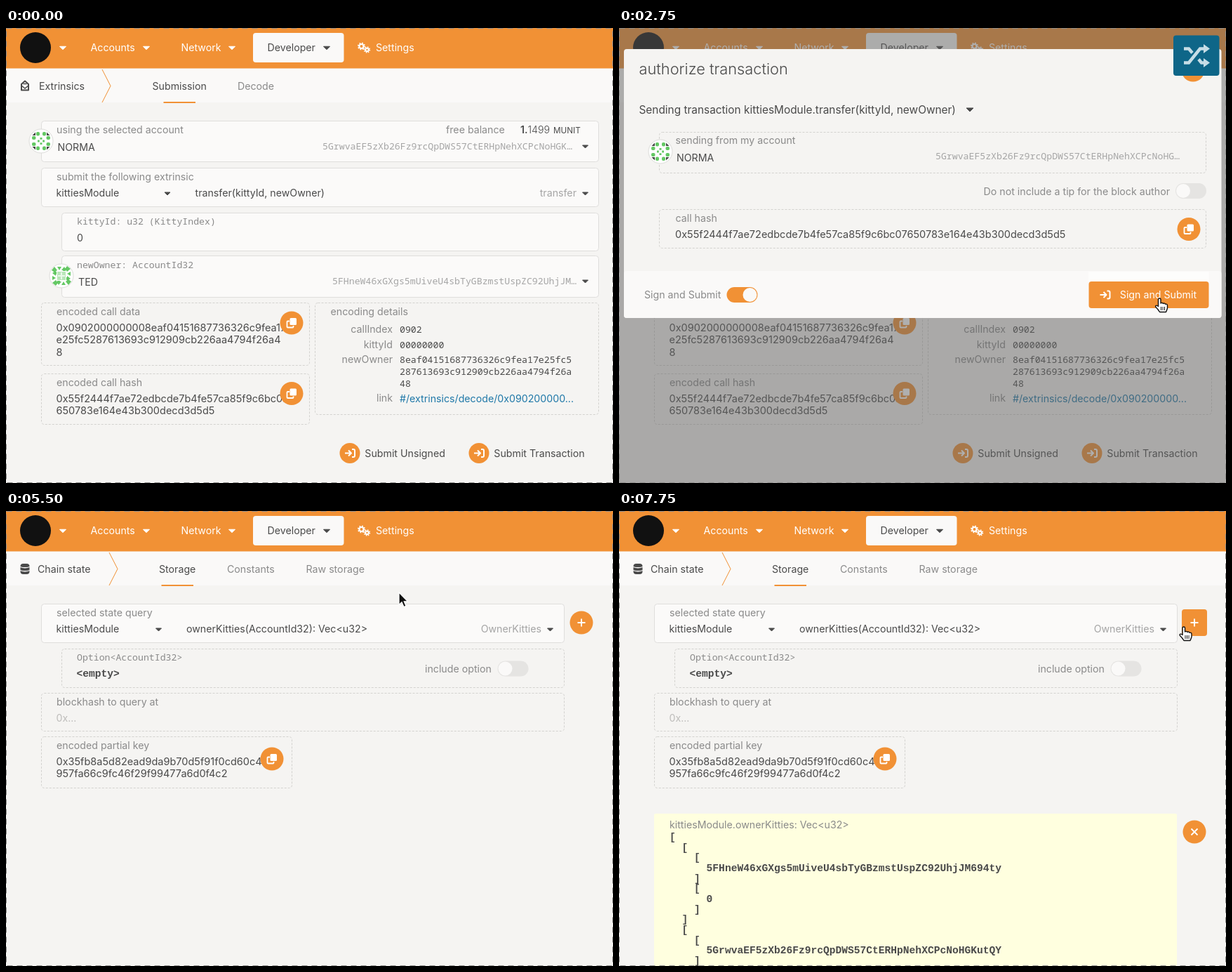
Animation of 865x648 px, one loop 8 s. Source, as an HTML page:

```html
<!DOCTYPE html>
<html lang="en">
<head>
<meta charset="utf-8">
<title>Submitting an extrinsic</title>
<style>
html, body { margin: 0; width: 100%; height: 100%; overflow: hidden; background: #f5f4f2; }
svg { display: block; width: 100%; height: 100%; }
text { font: 14.2px Inter, "Open Sans", sans-serif; fill: #4a4a4a; white-space: pre; }
.grey { fill: #8a8a8a; }
.pale { fill: #a5a5a5; }
.faint { fill: #bdbcba; }
.white { fill: #fff; }
.link { fill: #1f78a8; }
.hash { font-size: 14.5px; }
.mono { font: 13.2px "Noto Sans Mono", "DejaVu Sans Mono", monospace; }
.code { font: bold 14.6px "Liberation Mono", "Courier New", monospace; }
.medium { font-weight: 500; }
.end { text-anchor: end; }
.title { font-size: 21.8px; font-weight: 300; }
.lead { font-size: 15.4px; }
</style>
</head>
<body>
<svg id="stage" viewBox="0 0 865 648" xmlns="http://www.w3.org/2000/svg"></svg>
<script>
const ORANGE = '#f19135', INK = '#4a4a4a', GREEN = '#64c864';
const SENDER_KEY = '5GrwvaEF5zXb26Fz9rcQpDWS57CtERHpNehXCPcNoHGKutQY';
const RECEIVER_KEY = '5FHneW46xGXgs5mUiveU4sbTyGBzmstUspZC92UhjJM694ty';
const CALL_HASH = '0x55f2444f7ae72edbcde7b4fe57ca85f9c6bc07650783e164e43b300decd3d5d5';
const SENDER = 'NORMA', RECEIVER = 'TED';

// ---- drawing helpers ----
const esc = s => s.replace(/&/g, '&amp;').replace(/</g, '&lt;');
const text = (x, y, s, cls = '') => `<text x="${x}" y="${y}" class="${cls}">${esc(s)}</text>`;
const rect = (x1, y1, x2, y2, fill, r = 0, extra = '') =>
  `<rect x="${x1}" y="${y1}" width="${x2 - x1}" height="${y2 - y1}" rx="${r}" fill="${fill}" ${extra}/>`;
const disc = (x, y, r, fill, extra = '') => `<circle cx="${x}" cy="${y}" r="${r}" fill="${fill}" ${extra}/>`;
const line = (d, color, w = 1, extra = '') =>
  `<path d="${d}" fill="none" stroke="${color}" stroke-width="${w}" ${extra}/>`;
const group = (id, ...parts) => `<g id="${id}">${parts.join('')}</g>`;
const at = (x, y, s) => `<g transform="translate(${x} ${y})">${s}</g>`;

const caret = (x, y, fill = INK, w = 4.5) =>
  `<path d="M${x - w} ${y - w / 2}h${2 * w}l${-w} ${w}z" fill="${fill}" stroke="${fill}" stroke-linejoin="round"/>`;
const field = (x1, y1, x2, y2) => rect(x1 + .5, y1 + .5, x2 - .5, y2 - .5, '#fbfaf9', 4, 'stroke="#dfdedc"');
const dashed = (x1, y1, x2, y2) =>
  rect(x1 + .5, y1 + .5, x2 - .5, y2 - .5, 'none', 4, 'stroke="#d3d2cf" stroke-dasharray="3 2"');
const outline = (id, x1, y1, x2, y2) =>
  group(id, rect(x1 + .5, y1 + .5, x2 - .5, y2 - .5, 'none', 4, 'stroke="#a3a2a0"'));

const signIcon = (x, y) => at(x, y,
  line('M-7 0H1M-2 -4L2 0L-2 4M3 -5.5H5Q7 -5.5 7 -3.5V3.5Q7 5.5 5 5.5H3', '#fff', 2, 'stroke-linejoin="round"'));
const action = (x, y, label) => disc(x, y, 14.5, ORANGE) + signIcon(x, y) + text(x + 21.3, y + 5.3, label);
const solidAction = (x, y, x2, label) =>
  rect(x - 23, y - 19, x2, y + 19, ORANGE, 4) + signIcon(x, y) + text(x + 21.3, y + 5.3, label, 'white');
const copyButton = (x, y) => disc(x, y, 16.5, ORANGE) + at(x, y,
  line('M-3 -2.5H-5.5Q-6.5 -2.5 -6.5 -1.5V5.5Q-6.5 6.5 -5.5 6.5H1.5Q2.5 6.5 2.5 5.5V4', '#fff', 1.8) +
  rect(-2.5, -7, 7, 3, '#fff', 1.5));
const toggle = (x, y, on) => rect(x, y, x + 44, y + 22, on ? ORANGE : '#e5e4e2', 11) +
  disc(on ? x + 33 : x + 11, y + 11, 10, '#faf9f8');
const plusIcon = line('M814.5 159H825.5M820 153.5V164.5', '#fff', 2);

const turns = s => [0, 90, 180, 270].map(a => `<g transform="rotate(${a})">${s}</g>`).join('');
const badge = (x, y, inner) => at(x, y, disc(0, 0, 17, '#fff', 'stroke="#dddcda"') + inner);
const ringIcon = (x, y) => badge(x, y, turns(
  rect(-7, -13, -2, -7.5, GREEN, 2) + rect(2, -13, 7, -7.5, GREEN, 2) +
  '<path d="M8 -12.5l4.5 4.5h-4.5z" fill="#444"/>' + rect(-1.5, -5, 1.5, -2.2, GREEN, .5)));
const gridIcon = (x, y) => badge(x, y, rect(-6, -6, 6, 6, '#b9e6b9') + turns(
  '<path d="M-14 -8l4 -5l4 5l-4 3zM-6 -13h6l-3 5zM0 -8l4 -5l3 5z" fill="' + GREEN + '"/>' +
  rect(-11, -6, -7, -2, GREEN) + line('M0 -5V0', '#e9f8e9', 2)));

const gear = (x, y, r) => disc(x, y, r, 'none', 'stroke="#fff" stroke-width="2"') +
  disc(x, y, r + 1.5, 'none', `stroke="#fff" stroke-width="2" stroke-dasharray="${(r + 1.5) * Math.PI / 8}"`);

const subBar = (label, x, bend) => rect(0, 58, 865, 106, '#faf9f8') + text(x, 87.5, label) +
  line(`M${bend} 59L${bend + 12} 82.5L${bend} 106`, ORANGE);

// ---- header shared by both pages ----
const header = rect(0, 0, 865, 57.5, ORANGE) +
  disc(42, 28, 22, '#111') + caret(81, 28.5, '#fff') +
  text(120.5, 33, 'Accounts', 'white') + caret(200, 28.5, '#fff') +
  text(249.5, 33, 'Network', 'white') + caret(322, 28.5, '#fff') +
  rect(352, 7, 481.5, 49, '#faf9f8', 4) + text(372.5, 33, 'Developer') + caret(457, 28.5) +
  gear(506.5, 26, 3) + gear(514.5, 31, 2.2) + text(527, 33, 'Settings', 'white');

// ---- extrinsics page ----
const detail = (y, key, ...values) => text(551, y, key, 'grey end') +
  values.map((v, i) => text(561, y + i * 17.4, v, 'mono medium')).join('');

const extrinsics = group('extrinsics',
  subBar('Extrinsics', 47, 137),
  line('M22 80L27 75.5L32 80V88.5H22Z', INK, 2, 'stroke-linejoin="round"'),
  line('M22 82L27 86L32 82M24.5 79.5H29.5', INK, 1.6),
  text(208.5, 87.5, 'Submission'), text(330, 87.5, 'Decode', 'grey'),
  rect(224.5, 105, 270, 107, ORANGE),

  field(50, 132, 845, 191), ringIcon(50, 161),
  text(72, 150, 'using the selected account', 'grey'), text(73.5, 175, SENDER),
  text(627, 150, 'free balance', 'grey'),
  '<text x="733" y="150"><tspan font-weight="600">1.</tspan><tspan font-weight="300">1499</tspan></text>',
  '<text x="780" y="150" style="font-size:11.7px">MUNIT</text>',
  text(451, 172.5, SENDER_KEY.slice(0, 44) + '…', 'mono pale'), caret(825.5, 169, INK, 4),

  field(50, 199, 845, 255), text(72, 217, 'submit the following extrinsic', 'grey'),
  text(71.5, 240, 'kittiesModule'), caret(230, 236, INK, 4),
  text(269.5, 240, 'transfer(kittyId, newOwner)'),
  text(813, 240, 'transfer', 'pale end'), caret(825.5, 236, INK, 4),

  field(79, 263, 845, 318), text(101, 280, 'kittyId: u32 (KittyIndex)', 'mono grey'),
  text(101, 304, '0'),
  field(79, 324, 845, 384), outline('rowHover', 79, 324, 845, 384), gridIcon(79, 353),
  text(101, 342, 'newOwner: AccountId32', 'mono grey'), text(103, 367, RECEIVER),
  text(465, 365, RECEIVER_KEY.slice(0, 43) + '…', 'mono pale'), caret(825.5, 361, INK, 4),
  outline('topHover', 50, 132, 845, 191),

  dashed(50, 391, 433, 481), text(72, 409, 'encoded call data', 'grey'),
  ['0x0902000000008eaf04151687736326c9fea17', 'e25fc5287613693c912909cb226aa4794f26a4', '8']
    .map((s, i) => text(71.5, 432 + i * 17.3, s, 'hash')).join(''),
  copyButton(407, 420),
  dashed(50, 492, 433, 565), text(72, 510, 'encoded call hash', 'grey'),
  text(71.5, 533, CALL_HASH.slice(0, 40), 'hash'), text(71.5, 550, CALL_HASH.slice(40), 'hash'),
  copyButton(407, 520.5),

  dashed(440, 391, 845, 551), text(462.5, 409, 'encoding details', 'grey'),
  detail(434, 'callIndex', '0902'), detail(455.5, 'kittyId', '00000000'),
  detail(476.5, 'newOwner', '8eaf04151687736326c9fea17e25fc5', '287613693c912909cb226aa4794f26a', '48'),
  detail(532, 'link'), text(561, 532.5, '#/extrinsics/decode/0x090200000...', 'link'),

  action(490, 605.5, 'Submit Unsigned'), action(674, 605.5, 'Submit Transaction'),
  group('submitHover', solidAction(674, 605.5, 841, 'Submit Transaction')));

// ---- chain state page ----
const INDENT = 17.54;
const resultLines = [
  [0, '['], [1, '['], [2, '['], [3, RECEIVER_KEY], [2, ']'], [2, '['], [3, '0'], [2, ']'], [1, ']'],
  [1, '['], [2, '['], [3, SENDER_KEY], [2, ']']
];

const chain = group('chain',
  subBar('Chain state', 45, 147),
  rect(20.5, 75, 33.5, 90, INK, 4), line('M20 79.5Q27 82 34 79.5M20 84.5Q27 87 34 84.5', '#faf9f8', 1.3),
  text(218, 87.5, 'Storage'), text(315, 87.5, 'Constants', 'grey'), text(427.5, 87.5, 'Raw storage', 'grey'),
  rect(221.5, 105, 267, 107, ORANGE),

  field(50, 132, 796, 188),
  group('queryHover', line('M236 132.5H791.5Q795.5 132.5 795.5 136.5V183.5Q795.5 187.5 791.5 187.5H236', '#a3a2a0')),
  text(72, 150, 'selected state query', 'grey'),
  text(71.5, 173, 'kittiesModule'), caret(217.5, 169, INK, 4),
  text(257, 173, 'ownerKitties(AccountId32): Vec<u32>'),
  text(763, 173, 'OwnerKitties', 'pale end'), caret(775.5, 169, INK, 4),
  group('plus', disc(820, 159, 16.5, ORANGE)),
  group('plusHover', rect(802, 140, 838, 178, ORANGE, 4)), plusIcon,

  dashed(79, 196, 796, 252), text(101, 213, 'Option<AccountId32>', 'mono grey'),
  text(100.5, 236, '<empty>', 'code'),
  text(597, 230, 'include option', 'grey'), toggle(700.5, 213.5, false),
  dashed(50, 259, 796, 314), text(72, 277, 'blockhash to query at', 'grey'), text(71.5, 300, '0x...', 'faint'),
  dashed(50, 321, 408, 395), text(72, 339, 'encoded partial key', 'grey'),
  text(71.5, 361.5, '0x35fb8a5d82ead9da9b70d5f91f0cd60c4', 'hash'),
  text(71.5, 378.5, '957fa66c9fc46f29f99477a6d0f4c2', 'hash'), copyButton(379, 353),

  group('result', rect(50, 431, 795, 648, '#ffffdf', 2),
    text(72, 452, 'kittiesModule.ownerKitties: Vec<u32>', 'grey'),
    resultLines.map(([depth, s], i) => text(72 + depth * INDENT, 469 + i * 14.67, s, 'code')).join(''),
    disc(820, 457, 16.5, ORANGE), line('M815.5 452.5l9 9m0 -9l-9 9', '#fff', 1.8)));

// ---- authorize dialog ----
const dialog = group('dialog',
  rect(0, 0, 865, 648, 'rgba(96,96,96,.5)'),
  rect(7, 30, 858.5, 413, '#f5f4f2', 4), rect(7, 346, 858.5, 413, '#faf9f8', 4),
  disc(818, 60, 16.5, ORANGE),
  text(28.5, 66, 'authorize transaction', 'title'),
  text(28.5, 121.5, 'Sending transaction kittiesModule.transfer(kittyId, newOwner)', 'lead'), caret(500, 116.5, INK, 5),
  dashed(57, 148, 837, 207), ringIcon(59, 176),
  text(80.5, 164.5, 'sending from my account', 'grey'), text(82, 190, SENDER),
  text(451, 187, SENDER_KEY.slice(0, 43) + '…', 'mono pale'),
  text(785, 237.5, 'Do not include a tip for the block author', 'grey end'), toggle(793, 221, false),
  dashed(57, 258, 837, 314), text(80.5, 276, 'call hash', 'grey'),
  text(80, 299, CALL_HASH, 'hash'), copyButton(812, 286.5),
  text(36, 385.3, 'Sign and Submit', 'grey'), toggle(153.5, 369, true),
  group('sign', action(692.5, 380, 'Sign and Submit')),
  group('signHover', rect(669, 347, 840.5, 361, '#fdfdfc'), solidAction(692.5, 380, 840.5, 'Sign and Submit')));

// ---- notifications ----
const toast = (id, y, fill, icon) => group(id, at(790, y, rect(0, 0, 65.5, 57.5, fill, 4) + icon));
const cross = line('M50 10.5l8 8m0 -8l-8 8', '#fff', 1.6);
const soft = '#c6dde6', mint = '#c8e2e2';
const toasts =
  toast('queued', 10.5, '#0e6688',
    line('M15 19H22L27 25M36 34L40 39H45M15 39H22L38 19H45', soft, 4.5) +
    `<path d="M43 12.5l9 6.5l-9 6.5zM43 32.5l9 6.5l-9 6.5z" fill="${soft}"/>`) +
  toast('ready', 10.5, '#0e6688',
    disc(33, 28.5, 17, '#80b1c5') + disc(25.5, 21.5, 6, '#b9d6e1') + disc(37.5, 36, 5, '#a0c6d5') + disc(40, 21, 3, '#94bdce')) +
  toast('done', 10.5, '#0f800f',
    line('M18 29L28 39L48 18', '#cfe6cf', 4.5) + cross) +
  toast('events', 71.5, '#128080',
    line('M24 28A11 11 0 1 1 43 33C38 37 39 39 37 42A6 6 0 0 1 29 46', mint, 4) +
    line('M29.5 27A5 5 0 0 1 39 27', mint, 3.2) +
    disc(17.5, 46, 2.5, mint) + disc(23, 40.5, 2.5, mint) + disc(28, 35.5, 2.3, mint) +
    line('M41 10Q49 15 50.5 24', mint, 3) + cross);

// ---- pointers, tip at 0,0 ----
const pointers =
  group('arrow', '<path d="M0 0V17.5L4 13.8L7 20.5L10 19.2L7.2 12.8H12.5Z" fill="#111" stroke="#fff" stroke-width="1.2"/>') +
  group('hand', '<path d="M-2 1.5C-2 -.5 1.5 -.5 1.5 1.5V7Q4 5.5 4.8 7.5Q7 6.3 8 8.3Q11 7.5 11 10.5V14Q10.5 16 9 19.5H0Q-2 16 -5.5 12.5C-7 10.5 -4.5 9 -2 11.5Z" fill="#fff" stroke="#111" stroke-width="1.4" stroke-linejoin="round"/>' +
    line('M2 12V17M4.5 12V17M7 12V17', '#111', 1));

const frame = rect(.5, .5, 864.5, 647.5, 'none', 0, 'stroke="#8d8c8a" stroke-dasharray="8 6"');

const stage = document.getElementById('stage');
stage.innerHTML = header + extrinsics + chain + dialog + toasts + frame + pointers;

// ---- timeline: parts visible from..until ----
const LOOP = 8000, STEP = 250;
const spans = {
  extrinsics: [[0, 5500]],
  chain: [[5500, 8000]],
  dialog: [[1500, 3000]],
  submitHover: [[1000, 1500]],
  sign: [[1500, 2500]],
  signHover: [[2500, 3000]],
  rowHover: [[3000, 4000]],
  topHover: [[4250, 4500]],
  queued: [[1500, 3000]],
  ready: [[3000, 4250]],
  done: [[4250, 5500]],
  events: [[4250, 5500]],
  queryHover: [[5750, 7250]],
  plus: [[5500, 7250]],
  plusHover: [[7250, 8000]],
  result: [[7750, 8000]],
  arrow: [[250, 1000], [1500, 2500], [4500, 4750], [5500, 5750]],
  hand: [[1000, 1500], [2500, 4500], [5750, 8000]]
};
const path = [
  [250, 856, 345], [1000, 712, 609], [1750, 712, 609], [2500, 770.5, 385], [3750, 770.5, 385],
  [4500, 458, 105], [5500, 560, 116], [6250, 723, 173.5], [6500, 723, 173.5], [7250, 805, 165], [8000, 805, 165]
];
const node = Object.fromEntries(Object.keys(spans).map(id => [id, document.getElementById(id)]));

function pointAt(t) {
  const i = path.findIndex(p => p[0] > t);
  if (i < 1) return path[0].slice(1);
  const [t0, x0, y0] = path[i - 1], [t1, x1, y1] = path[i];
  const u = (t - t0) / (t1 - t0), e = u * u * (3 - 2 * u);
  return [x0 + (x1 - x0) * e, y0 + (y1 - y0) * e];
}

function draw(now) {
  const t = Math.floor((now % LOOP) / STEP) * STEP;
  for (const id in spans) {
    const on = spans[id].some(([from, until]) => t >= from && t < until);
    node[id].style.display = on ? '' : 'none';
  }
  const move = `translate(${pointAt(t).join(' ')})`;
  node.arrow.setAttribute('transform', move);
  node.hand.setAttribute('transform', move);
}

const start = performance.now();
function tick() {
  draw(performance.now() - start);
  requestAnimationFrame(tick);
}
tick();
</script>
</body>
</html>
```
